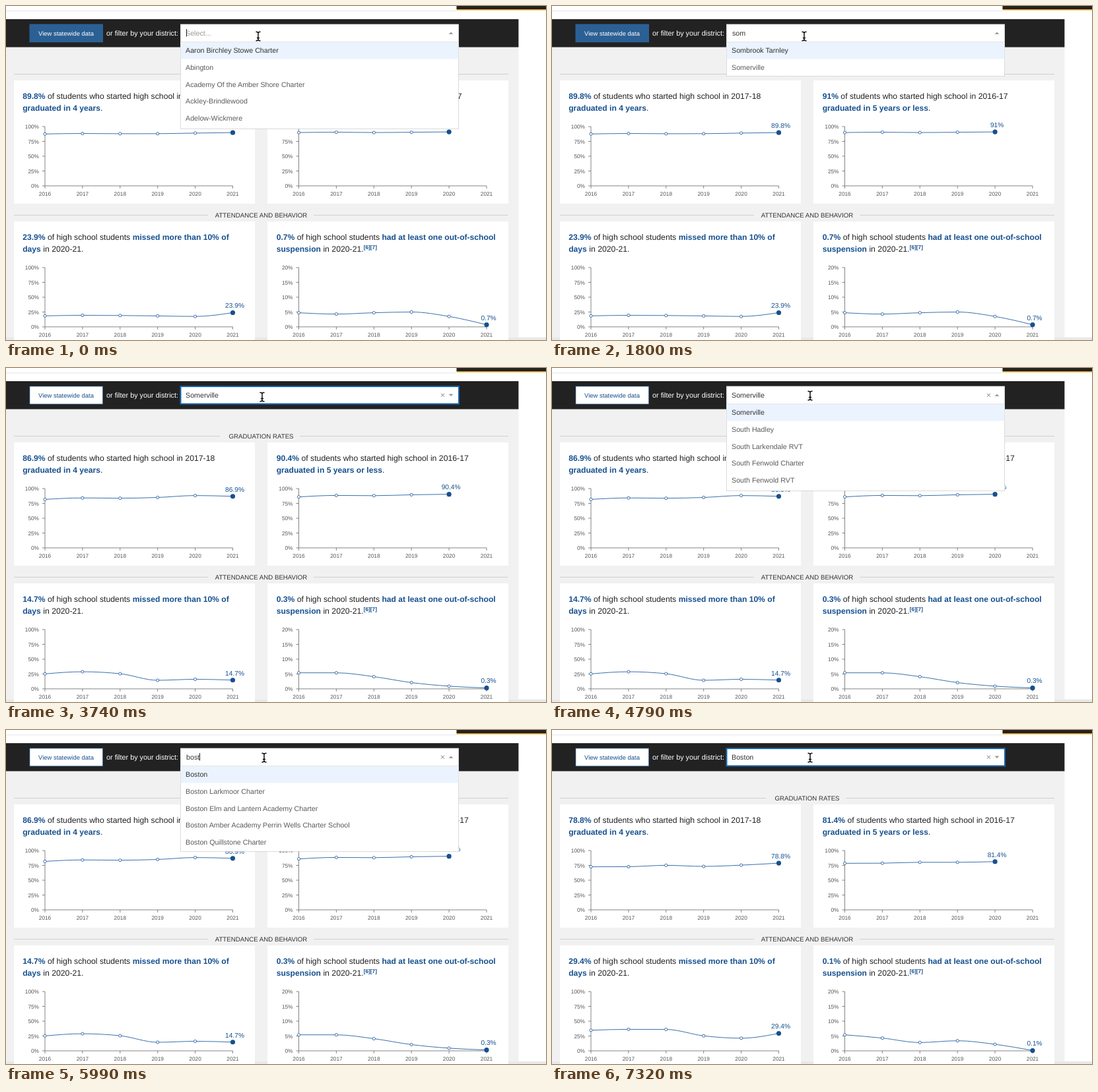
Recreate the animation shown at these times as an HTML page with a canvas. Size 818 px wide and 507 px high, loop 8000 ms.

```html
<!DOCTYPE html>
<html lang="en">
<head>
<meta charset="utf-8">
<title>District dashboard</title>
<style>
html, body { margin: 0; width: 100%; height: 100%; overflow: hidden; background: #fff; }
canvas { display: block; width: 818px; height: 507px; }
</style>
</head>
<body>
<canvas id="stage"></canvas>
<script>
const W = 818, H = 507, LOOP = 8000, MORPH = 450;
const FONT = '"Liberation Sans", Arial, sans-serif';
const BLUE = '#16508f', INK = '#222', GREY = '#5a5a5a';
const canvas = document.getElementById('stage');
const ctx = canvas.getContext('2d');
const ratio = window.devicePixelRatio || 1;
canvas.width = W * ratio;
canvas.height = H * ratio;
ctx.textRendering = 'geometricPrecision';

// One row per chart: yearly values from 2016 on
const statewide = [
  [87.5, 88.3, 87.9, 88, 89, 89.8],
  [89.9, 90.5, 89.9, 90.4, 91],
  [18.5, 19.4, 19.1, 18.4, 17.5, 23.9],
  [4.75, 4.3, 4.75, 5, 3.5, 0.7]
];
const somerville = [
  [81.7, 84.2, 83.7, 85, 88.2, 86.9],
  [85.9, 88.4, 88, 89.5, 90.4],
  [25.2, 28.8, 25.5, 14.4, 16.1, 14.7],
  [5.4, 5.4, 4.1, 2.1, 0.9, 0.3]
];
const boston = [
  [72.6, 72.8, 75.1, 73.3, 75.4, 78.8],
  [78.5, 78.7, 80.2, 80.2, 81.4],
  [34.7, 36.2, 36.1, 25.3, 21.3, 29.4],
  [5.4, 4.3, 2.8, 3.4, 2.2, 0.1]
];

const charts = [
  { x: 59, y: 183, max: 100 },
  { x: 443.5, y: 183, max: 100 },
  { x: 59, y: 397, max: 100 },
  { x: 443.5, y: 397, max: 20 }
];
const STEP = 56.9, TALL = 90;

const lists = {
  all: ['Aaron Birchley Stowe Charter', 'Abington', 'Academy Of the Amber Shore Charter',
    'Ackley-Brindlewood', 'Adelow-Wickmere', 'Agawam'],
  so: ['Hudson', 'Monson', 'Sombrook Tarnley', 'Somerville', 'South Hadley', 'Southbridge'],
  som: ['Sombrook Tarnley', 'Somerville'],
  near: ['Somerville', 'South Hadley', 'South Larkendale RVT', 'South Fenwold Charter',
    'South Fenwold RVT', 'Southbridge'],
  b: ['Aaron Birchley Stowe Charter', 'Abington', 'Academy Of the Amber Shore Charter',
    'Ackley-Brindlewood', 'Amesbury', 'Belchertown'],
  bost: ['Boston', 'Boston Larkmoor Charter', 'Boston Elm and Lantern Academy Charter',
    'Boston Amber Academy Perrin Wells Charter School', 'Boston Quillstone Charter']
};

// Each entry changes only the fields it names
const script = [
  [0, { menu: 'all', mark: 0, caret: 1, typed: '', value: '', mouse: [382, 46] }],
  [300, { caret: 0 }],
  [750, { caret: 1 }],
  [1200, { typed: 'so', menu: 'so' }],
  [1350, { typed: 'som', menu: 'som' }],
  [1800, { caret: 0 }],
  [2100, { mark: 1 }],
  [2400, { typed: '', menu: '', mark: 0, value: 'Somerville' }],
  [3740, { mouse: [388, 44] }],
  [3890, { mouse: [391, 42] }],
  [4040, { menu: 'near' }],
  [4340, { caret: 1 }],
  [4790, { caret: 0 }],
  [5240, { typed: 'b', menu: 'b', caret: 1 }],
  [5840, { typed: 'bos', menu: 'bost' }],
  [5990, { typed: 'bost' }],
  [6140, { typed: 'bosto' }],
  [6280, { typed: 'boston' }],
  [6730, { typed: '', menu: '', caret: 0, value: 'Boston' }]
];
const picks = [
  { from: statewide, to: somerville, ticks: [2400, 2550, 2700, 2850] },
  { from: somerville, to: boston, ticks: [6730, 6880, 7030, 7170, 7320] }
];

function stateAt(t) {
  const s = {};
  for (const [at, change] of script) if (at <= t) Object.assign(s, change);
  return s;
}

function ease(t) {
  const bez = (a, b, u) => 3 * a * u * (1 - u) ** 2 + 3 * b * u * u * (1 - u) + u ** 3;
  let lo = 0, hi = 1;
  for (let i = 0; i < 24; i++) {
    const mid = (lo + hi) / 2;
    if (bez(0.25, 0.25, mid) < t) lo = mid; else hi = mid;
  }
  return bez(0.1, 1, lo);
}

function dataAt(t) {
  const pick = picks.filter(p => p.ticks[0] <= t).pop();
  if (!pick) return { rows: statewide, last: statewide, done: true };
  const now = pick.ticks.filter(k => k <= t).pop() - pick.ticks[0];
  const p = now >= MORPH ? 1 : ease(now / MORPH);
  const rows = pick.to.map((row, r) => row.map((v, i) => pick.from[r][i] + (v - pick.from[r][i]) * p));
  return { rows, last: pick.to, done: now >= MORPH };
}

function box(x, y, w, h, color) {
  ctx.fillStyle = color;
  ctx.fillRect(x, y, w, h);
}

function text(str, x, y, size, color, align = 'left', weight = 'normal') {
  ctx.font = `${weight} ${size}px ${FONT}`;
  ctx.fillStyle = color;
  ctx.textAlign = align;
  ctx.fillText(str, x, y);
  return ctx.measureText(str).width;
}

// Text between asterisks is bold blue
function rich(str, x, y) {
  str.split('*').forEach((part, i) => {
    if (!part) return;
    x += i % 2 ? text(part, x, y, 12.12, BLUE, 'left', 'bold') : text(part, x, y, 12.25, INK);
  });
  return x;
}

function rule(x1, y1, x2, y2, color, width = 1) {
  ctx.strokeStyle = color;
  ctx.lineWidth = width;
  ctx.beginPath();
  ctx.moveTo(x1, y1);
  ctx.lineTo(x2, y2);
  ctx.stroke();
}

function page() {
  box(0, 0, W, H, '#fff');
  box(0, 7, 682, 1, '#e6e6e6');
  box(682.5, 0, 136, 5, '#222');
  box(682.5, 5, 136, 1.6, '#f5b022');
  box(0, 62, 776.4, 445, '#f1f1f1');
  box(0, 503, W, 4, '#e9e9e9');
  box(0, 20, 776.4, 42.5, '#222');
  for (const x of [12, 396]) {
    box(x, 113, 365, 187, '#fff');
    box(x, 327, 365, 180, '#fff');
  }
  section('GRADUATION RATES', 103.5, 324, 445);
  section('ATTENDANCE AND BEHAVIOR', 317.5, 306, 466);
}

function section(title, y, left, right) {
  rule(12, y, left, y, '#d0d0d0');
  rule(right, y, 761, y, '#d0d0d0');
  text(title, 386.5, y + 3, 9.7, '#333', 'center');
}

function headlines(rows) {
  const n = rows.map(r => r[r.length - 1] + '%');
  const left = 25.2, right = 409.7;
  rich(`*${n[0]}* of students who started high school in 2017-18`, left, 140.5);
  rich('*graduated in 4 years*.', left, 158.5);
  rich(`*${n[1]}* of students who started high school in 2016-17`, right, 140.5);
  rich('*graduated in 5 years or less*.', right, 158.5);
  rich(`*${n[2]}* of high school students *missed more than 10% of*`, left, 354.5);
  rich('*days* in 2020-21.', left, 372.5);
  rich(`*${n[3]}* of high school students *had at least one out-of-school*`, right, 354.5);
  const x = rich('*suspension* in 2020-21.', right, 372.5);
  text('[6][7]', x, 368.5, 8.3, BLUE, 'left', 'bold');
}

// Monotone cubic through evenly spaced points
function curve(pts) {
  const slope = pts.slice(1).map((p, i) => (p[1] - pts[i][1]) / STEP);
  const end = pts.length - 1;
  const m = pts.map((p, i) => {
    const a = slope[i - 1], b = slope[i];
    if (i === 0 || i === end) return 0;
    return (Math.sign(a) + Math.sign(b)) * Math.min(Math.abs(a), Math.abs(b), Math.abs(a + b) / 4);
  });
  m[0] = (3 * slope[0] - m[1]) / 2;
  m[end] = (3 * slope[end - 1] - m[end - 1]) / 2;
  const d = STEP / 3;
  ctx.beginPath();
  ctx.moveTo(...pts[0]);
  for (let i = 0; i < end; i++) {
    const [x, y] = pts[i], [u, v] = pts[i + 1];
    ctx.bezierCurveTo(x + d, y + d * m[i], u - d, v - d * m[i + 1], u, v);
  }
  ctx.strokeStyle = '#3a70ac';
  ctx.lineWidth = 1;
  ctx.stroke();
}

function chart({ x, y, max }, row, label, done) {
  const base = y + TALL;
  rule(x, y, x, base, '#777', 0.9);
  rule(x, base, x + 5 * STEP, base, '#777', 0.9);
  for (let i = 0; i < 5; i++) {
    const ty = base - i * TALL / 4;
    rule(x - 4, ty, x, ty, '#777', 0.9);
    text(max * i / 4 + '%', x - 9, ty + 3, 8.3, '#555', 'right');
  }
  for (let i = 0; i < 6; i++) {
    const tx = x + i * STEP;
    rule(tx, base, tx, base + 4, '#777', 0.9);
    text(2016 + i, tx, base + 15.2, 8.3, '#555', 'center');
  }
  const pts = row.map((v, i) => [x + i * STEP, base - v / max * TALL]);
  curve(pts);
  if (!done) return;
  pts.forEach(([px, py], i) => {
    const last = i === pts.length - 1;
    ctx.beginPath();
    ctx.arc(px, py, last ? 3.6 : 2.1, 0, 7);
    ctx.fillStyle = last ? BLUE : '#fff';
    ctx.fill();
    if (!last) ctx.stroke();
    if (last) text(label + '%', px + 3, py - 7.2, 10.2, BLUE, 'center');
  });
}

function selectBox(s, t) {
  const picked = s.value !== '';
  box(35.5, 27.4, 111.5, 27.8, '#2b6095');
  if (picked) box(36.3, 28.2, 109.9, 26.2, '#fff');
  text('View statewide data', 91, 44.8, 9.45, picked ? BLUE : '#fff', 'center');
  text('or filter by your district:', 152, 44.5, 10.85, '#fff');

  if (s.menu) {
    box(264, 27.4, 422, 28, '#ccc');
    box(264.7, 28.1, 420.6, 27, '#fff');
    menu(lists[s.menu], s.mark);
  } else {
    box(263.5, 27, 423.5, 28.5, '#1768b3');
    box(265.5, 29, 419.5, 24.5, '#fff');
  }

  let end = 273;
  if (s.typed) end += text(s.typed, 273, 44.7, 10.7, '#333');
  else if (picked) text(s.value, 272, 45.2, 10.7, '#333');
  else text('Select...', 272, 45.2, 10.7, '#999');
  if (s.caret) box(Math.round(end), 35, 1, 11.5, '#222');

  if (picked) {
    const tint = t >= 2400 && t < 2550 ? '#ddd' : '#777';
    rule(659, 38.7, 664, 43.7, tint);
    rule(664, 38.7, 659, 43.7, tint);
  }
  const tip = s.menu ? -1.6 : 1.8;
  ctx.fillStyle = '#999';
  ctx.beginPath();
  ctx.moveTo(670.5, 41.2 - tip);
  ctx.lineTo(677.5, 41.2 - tip);
  ctx.lineTo(674, 41.2 + tip);
  ctx.fill();
}

function menu(items, mark) {
  const row = 25.9, top = 54.5;
  const tall = Math.min(131.5, items.length * row);
  box(264, top, 422, tall + 0.7, '#ccc');
  box(264.7, top + 0.5, 420.6, tall - 0.5, '#fff');
  items.slice(0, 5).forEach((name, i) => {
    const y = top + i * row;
    if (i === mark) box(264.7, y + 0.5, 420.6, row - 0.5, '#ebf3fe');
    text(name, 272, y + 16.2, 10.7, i === mark ? '#333' : GREY);
  });
}

function pointer([x, y]) {
  ctx.lineCap = 'round';
  for (const [color, width] of [['#fff', 3], ['#000', 1.4]]) {
    ctx.strokeStyle = color;
    ctx.lineWidth = width;
    ctx.beginPath();
    for (const k of [-1, 1]) {
      ctx.moveTo(x - 3, y + 6.8 * k);
      ctx.quadraticCurveTo(x, y + 6.8 * k, x, y + 4.8 * k);
      ctx.quadraticCurveTo(x, y + 6.8 * k, x + 3, y + 6.8 * k);
    }
    ctx.moveTo(x, y - 5);
    ctx.lineTo(x, y + 5);
    ctx.moveTo(x - 1.5, y + 2.5);
    ctx.lineTo(x + 1.5, y + 2.5);
    ctx.stroke();
  }
  ctx.lineCap = 'butt';
}

function draw(t) {
  ctx.setTransform(ratio, 0, 0, ratio, 0, 0);
  const s = stateAt(t), data = dataAt(t);
  page();
  headlines(data.last);
  charts.forEach((c, i) => chart(c, data.rows[i], data.last[i][data.last[i].length - 1], data.done));
  selectBox(s, t);
  pointer(s.mouse);
}

const start = performance.now();
function tick() {
  draw((performance.now() - start) % LOOP);
  requestAnimationFrame(tick);
}
tick();
</script>
</body>
</html>
```
